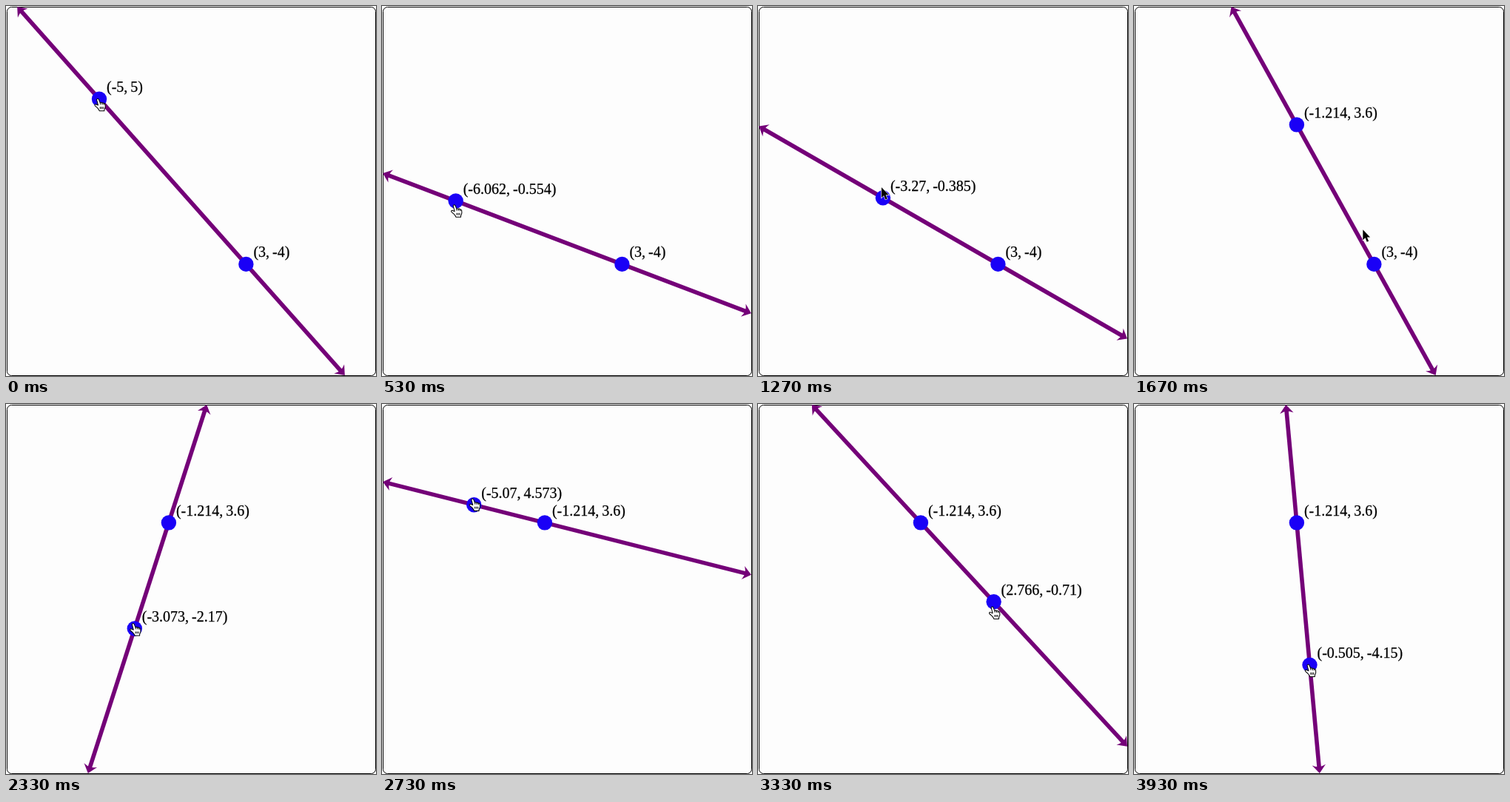
These frames come from a looping animation (500x500 px, 3990 ms). An HTML page:

```html
<!DOCTYPE html>
<html lang="en">
<head>
<meta charset="utf-8">
<title>Line through two points</title>
<style>
  html, body { margin: 0; width: 100%; height: 100%; overflow: hidden; background: #fff; }
  svg { display: block; width: 100vw; height: 100vh; }
  text { font: 20px "Liberation Serif", Times, serif; white-space: pre; word-spacing: -1px; stroke: #000; stroke-width: .25; }
  .board { fill: #fdfdfd; stroke: #000; }
  .line { stroke: #740078; stroke-width: 5.6; }
  .head { fill: #740078; }
  .dot { fill: #1a00f6; }
  .hand { fill: #fff; stroke: #000; stroke-width: 1.1; stroke-linejoin: round; }
  .arrow { stroke: #fff; stroke-width: 1.2; paint-order: stroke; }
</style>
</head>
<body>
<svg viewBox="0 0 500 500">
  <rect class="board" x="1.5" y="1.5" width="498" height="498" rx="6"/>
  <line class="line" id="line"/>
  <path class="head" id="head1"/>
  <path class="head" id="head2"/>
  <circle class="dot" id="dot1" r="10.2"/>
  <circle class="dot" id="dot2" r="10.2"/>
  <text id="label1"></text>
  <text id="label2"></text>
  <g id="pointer">
    <g id="hand" class="hand">
      <g transform="translate(0 -1.5) scale(.93)">
        <path d="M-1.6 1.6Q-.2-.8 1.5 1.2L3.4 6Q5 4.9 6 6.3Q7.6 5.5 8.5 7Q10.3 6.5 10.8 8.6L11 12Q10.5 14 9.5 16V18H2.5Q1.5 15.5-.5 13.5L-4 10.5Q-5.2 8.6-3.1 8.2L.5 9.6Z"/>
        <path fill="none" d="M3.4 6L4 8.6M6 6.3L6.6 8.8M8.5 7L9 9.2M3.6 12V15M5.7 12V15M7.8 12V15"/>
      </g>
    </g>
    <path id="arrow" class="arrow" d="M0 0V14L3.2 11L5.4 16.4L7.8 15.4L5.6 10.2H9.8Z"/>
  </g>
</svg>
<script>
const LOOP = 3990, UNIT = 24.8, CX = 250, CY = 249.7, MIN = 1, MAX = 499;
const PIVOT = [-1.214, 3.6];    // where the first point is dropped
const DROP = 22, GRAB = 28;     // steps between which the pointer changes points

// Key points of each drag: [step, x, y] in board units.
const drag1 = [[1, -5, 5], [8, -6.062, -.554], [15, -6.439, -6.526], [DROP, ...PIVOT]];
const drag2 = [[GRAB, 3, -4], [41, -5.07, 4.573], [50, 2.766, -.71], [59, -.505, -4.15]];

const $ = id => document.getElementById(id);

function set(id, attrs) {
  for (const name in attrs) $(id).setAttribute(name, attrs[name]);
}

// Monotone cubic through the keys: rests at the ends and turning points.
function follow(keys, step) {
  const last = keys.length - 1;
  const t = Math.min(Math.max(step, keys[0][0]), keys[last][0]);
  const i = Math.min(keys.findLastIndex(k => k[0] <= t), last - 1);
  const a = keys[i], b = keys[i + 1], h = b[0] - a[0], u = (t - a[0]) / h;
  const rate = (p, q, c) => (q[c] - p[c]) / (q[0] - p[0]);
  const slope = (j, c) => {
    if (j === 0 || j === last) return 0;
    const before = rate(keys[j - 1], keys[j], c), after = rate(keys[j], keys[j + 1], c);
    if (before * after <= 0) return 0;
    const limit = 3 * Math.min(Math.abs(before), Math.abs(after));
    const mean = rate(keys[j - 1], keys[j + 1], c);
    return Math.sign(mean) * Math.min(Math.abs(mean), limit);
  };
  return [1, 2].map(c => {
    const m = slope(i, c) * h, n = slope(i + 1, c) * h, d = b[c] - a[c];
    return a[c] + u * (m + u * (3 * d - 2 * m - n + u * (m + n - 2 * d)));
  });
}

// The second point circles the pivot clockwise, so its keys become [step, radius, angle].
let heading = Infinity;
const orbit = drag2.map(([step, x, y]) => {
  const dx = x - PIVOT[0], dy = y - PIVOT[1];
  let angle = Math.atan2(dy, dx);
  while (angle > heading) angle -= 2 * Math.PI;
  heading = angle;
  return [step, Math.hypot(dx, dy), angle];
});

const first = step => follow(drag1, step);
function second(step) {
  const [r, angle] = follow(orbit, step);
  return [PIVOT[0] + r * Math.cos(angle), PIVOT[1] + r * Math.sin(angle)];
}

const toPixel = ([x, y]) => [CX + x * UNIT, CY - y * UNIT];
const round = v => Number(v.toFixed(3));
const distance = (p, q) => Math.hypot(q[0] - p[0], q[1] - p[1]);

// Where a ray from p along unit vector d leaves the board.
function edge(p, d) {
  const reach = [0, 1].map(c => d[c] ? ((d[c] > 0 ? MAX : MIN) - p[c]) / d[c] : Infinity);
  const r = Math.min(...reach);
  return [p[0] + d[0] * r, p[1] + d[1] * r];
}

function drawHead(id, tip, [dx, dy]) {
  const at = (back, side) => [tip[0] - dx * back - dy * side, tip[1] - dy * back + dx * side];
  set(id, { d: `M${tip}L${at(11.5, 9.2)}Q${at(8.5, 3)} ${at(9, 0)}Q${at(8.5, -3)} ${at(11.5, -9.2)}Z` });
}

function drawPoint(n, unit, [x, y]) {
  set("dot" + n, { cx: x, cy: y });
  set("label" + n, { x: x + 10, y: y - 9.5 });
  $("label" + n).textContent = `(${round(unit[0])}, ${round(unit[1])})`;
}

// While dragging, the pointer runs a little ahead vertically; in between it glides over.
function pointerAt(step, p, q) {
  const u = Math.min(Math.max((step - DROP) / (GRAB - DROP), 0), 1);
  const glide = (c, power) => p[c] + (q[c] - p[c]) * (1 - (1 - u) ** power);
  const move = u < 1 ? first : second;
  const speed = toPixel(move(step + .5))[1] - toPixel(move(step - .5))[1];
  return [glide(0, 3) - 2, glide(1, 2) + .5 + speed * .28];
}

function draw(step) {
  const a = first(step), b = second(step);
  const p = toPixel(a), q = toPixel(b);
  const len = distance(p, q);
  const dir = [(q[0] - p[0]) / len, (q[1] - p[1]) / len];
  const back = dir.map(v => -v);
  const start = edge(p, back), end = edge(p, dir);

  set("line", {
    x1: start[0] + dir[0] * 7, y1: start[1] + dir[1] * 7,
    x2: end[0] - dir[0] * 7, y2: end[1] - dir[1] * 7
  });
  drawHead("head1", start, back);
  drawHead("head2", end, dir);
  drawPoint(1, a, p);
  drawPoint(2, b, q);

  const tip = pointerAt(step, p, q);
  const over = Math.min(distance(tip, p), distance(tip, q)) < 12;
  set("pointer", { transform: `translate(${tip})` });
  set("hand", { display: over ? "inline" : "none" });
  set("arrow", { display: over ? "none" : "inline" });
}

// Fifteen steps a second, each start rounded to 10 ms; the first pose lasts two steps.
const stepAt = ms => Math.max(1, Math.floor((Math.floor(ms / 10) + .5) * 3 / 20));

const began = performance.now();
function tick() {
  draw(stepAt((performance.now() - began) % LOOP));
  requestAnimationFrame(tick);
}
tick();
</script>
</body>
</html>
```
